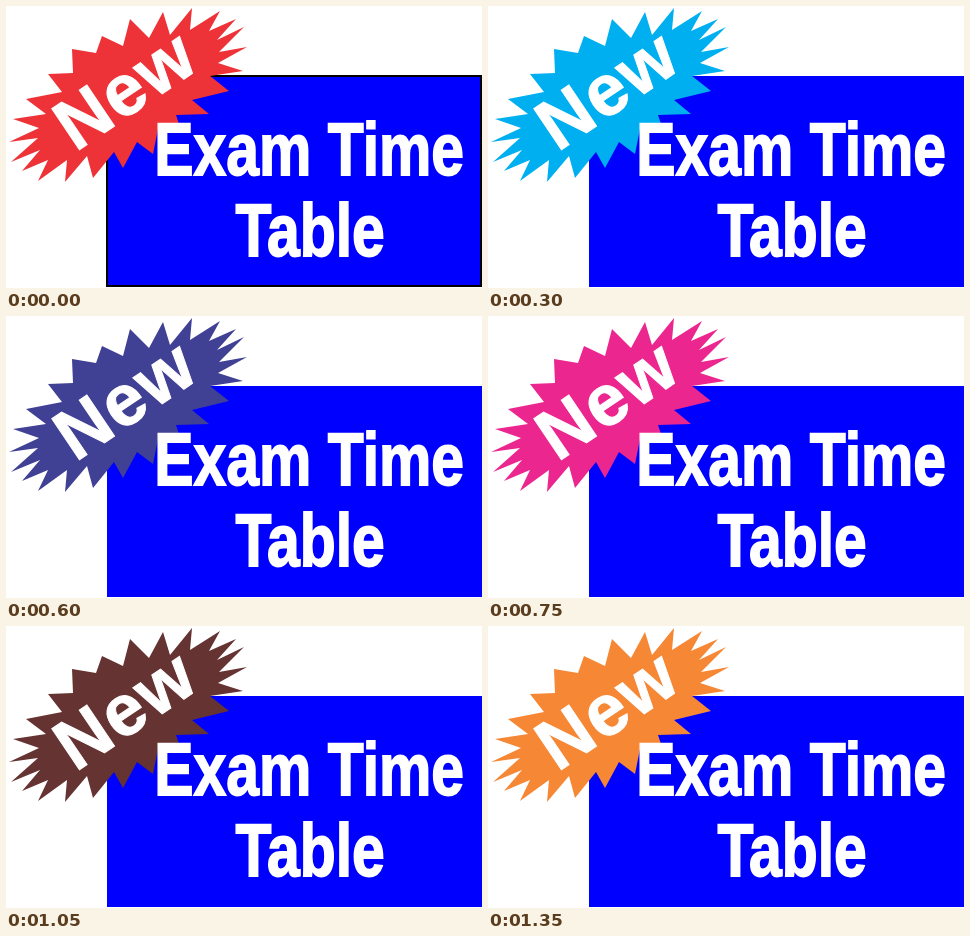
An HTML page that plays this animation: 476x282 px, repeating every 1.5 s.

```html
<!DOCTYPE html>
<html lang="en">
<head>
<meta charset="utf-8">
<title>Exam Time Table</title>
<style>
  html, body { margin: 0; width: 100%; height: 100%; overflow: hidden; background: #fff; }
  svg { display: block; width: 476px; height: 282px; }
  text { font-family: "Liberation Sans", Arial, sans-serif; font-weight: bold; fill: #fff; stroke: #fff; }
</style>
</head>
<body>
<svg viewBox="0 0 476 282">
  <rect id="frame" x="100" y="69" width="376" height="212"/>
  <rect id="panel" fill="#00f"/>
  <polygon id="burst" points="42,68 67,67 66,43 90,47 96,30 117,40 124,13
    143,32 157,6 164,29 186,2 184,24 214,5 203,25 230,13 211,34 238,21 213,46 241,41
    212,57 237,65 204,70 223,85 186,94 203,108 170,109 176,127 153,118 147,148 131,136
    117,162 108,146 87,172 81,150 59,176 61,154 32,175 42,154 16,165 34,144 5,156
    32,132 3,136 33,122 7,113 40,108 20,93 56,86"/>
  <text transform="translate(69.5 146.5) rotate(-34)" font-size="72" letter-spacing="1.5">New</text>
  <!-- condensed headline face -->
  <g transform="scale(.785 1)" font-size="75" stroke-width="1.8">
    <text x="189" y="168.9" style="stroke-width: 1.8">Exam Time</text>
    <text x="292.3" y="249.7" style="stroke-width: 1.8">Table</text>
  </g>
</svg>
<script>
  const STEP = 150;
  const colors = ["#ee3338", "#fff215", "#00aff0", "#00a651", "#404095",
                  "#ec268f", "#8dc63f", "#663333", "#92278f", "#f68735"];
  const [frame, panel, burst] = ["frame", "panel", "burst"].map(id => document.getElementById(id));

  function setBox(el, x, y, width, height) {
    Object.entries({ x, y, width, height }).forEach(([k, v]) => el.setAttribute(k, v));
  }

  function draw(now) {
    const step = Math.floor(now / STEP) % colors.length;
    burst.setAttribute("fill", colors[step]);
    // the black outline shows only during the first step
    frame.style.display = step ? "none" : "";
    if (step) setBox(panel, 101, 70, 375, 211);
    else setBox(panel, 102, 71, 372, 208);
    requestAnimationFrame(() => draw(performance.now()));
  }
  draw(0);
</script>
</body>
</html>
```
